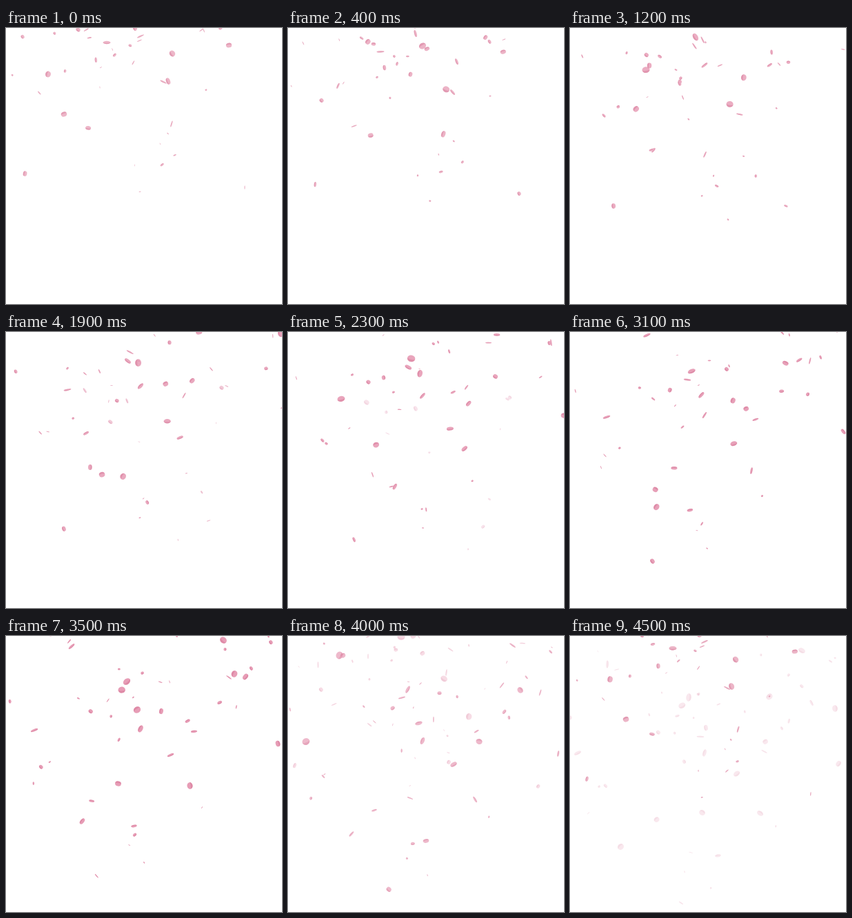
Animation, 400 px wide and 400 px high, one loop 4600 ms. Source, as an HTML page with a canvas:

```html
<!DOCTYPE html>
<html>
<head>
<meta charset="utf-8">
<title>Falling petals</title>
<style>
html, body { margin: 0; width: 100%; height: 100%; overflow: hidden; background: #fff; }
canvas { display: block; width: 400px; height: 400px; }
</style>
</head>
<body>
<canvas id="stage" width="400" height="400"></canvas>
<script>
const LOOP = 4600, STEP = 100, LATE = 3500;
const ctx = document.getElementById('stage').getContext('2d');

let seed = 11;
const random = (min = 0, max = 1) => {
  seed = seed * 16807 % 2147483647;
  return min + (max - min) * seed / 2147483647;
};
const clamp = v => Math.max(0, Math.min(1, v));
const repeat = (n, make) => Array.from({ length: n }, make);

// A petal passes x, y at time `at` and drifts at vx, vy px/s.
const petal = (at, size, [x, y, vx, vy], fadeFrom = 3700, fadeTo = 4750) => ({
  at, size, x, y, vx, vy, fadeFrom, fadeTo,
  tilt: random(0, Math.PI), turn: random(-1, 1),
  phase: random(0, Math.PI), spin: random(2, 4)
});

// The large petals: already in the air, then arriving from above
const aloft = [
  [146, 21, -30, 33], [195, 12, 0, 35], [187, -1, -5.5, 22.6], [228, 78, 3, 27],
  [235, 77, 9, 40], [240, 139, -37, 37], [241, 37, 9, 29], [61, 67, 29, 42],
  [84, 125, 29, 43], [323, 25, -28, 24]
];
const arriving = [
  [175, 66, -3, 23], [95, 15, -41, 26], [190, 107, -1, 39], [315, 6, 21, 15],
  [331, 55, -42, 33], [347, 59, 37, 46], [323, 60, 27, 37], [394, 156, -5, 29]
];

// Small petals spread out from the upper left, thinning towards the ground
const drift = (width, depth) =>
  [width * random(), depth * random() ** 2, random(-28, 30), random(22, 44)];
const smallSize = () => 3 + 5 * random() ** 1.5;

const petals = [
  ...aloft.map((path, i) => petal(0, 11 - 0.3 * i, path)),
  ...repeat(15, () => petal(0, smallSize(), drift(280, 220))),
  ...repeat(11, () => petal(0, smallSize(), drift(370, 380), 1400, 2700)),
  ...arriving.map((path, i) => petal(LATE, 11.5 - 0.4 * i, path)),
  ...repeat(16, () => petal(LATE, smallSize(), drift(390, 110)))
];

function drawPetal(p, t) {
  const fadeIn = p.at ? 1 : clamp((t + 1000) / 900);
  const fadeOut = clamp((p.fadeTo - t) / (p.fadeTo - p.fadeFrom));
  const s = t / 1000, age = (t - p.at) / 1000;
  const facing = Math.cos(p.phase + p.spin * s) ** 2;
  const long = p.size / 2, wide = long * (0.18 + 0.7 * facing);
  const light = 82 - 6 * clamp(Math.abs(t) / LATE);

  ctx.save();
  ctx.globalAlpha = fadeIn * fadeOut;
  ctx.translate(p.x + p.vx * age, p.y + p.vy * age);
  ctx.rotate(p.tilt + p.turn * s);
  ctx.fillStyle = `hsl(340 60% ${light}%)`;
  ctx.beginPath();
  ctx.ellipse(0, 0, long, wide, 0, 0, 2 * Math.PI);
  ctx.fill();
  // Shaded lower edge
  ctx.fillStyle = 'rgba(200, 85, 125, .28)';
  ctx.beginPath();
  ctx.ellipse(0, 0, long, wide, 0, 0, Math.PI);
  ctx.ellipse(0, 0, long, wide * 0.3, 0, Math.PI, 0, true);
  ctx.fill();
  ctx.restore();
}

function frame(now) {
  const t = Math.floor(now % LOOP / STEP) * STEP;
  ctx.fillStyle = '#fff';
  ctx.fillRect(0, 0, 400, 400);
  for (const p of petals) {
    drawPetal(p, t);
    // The next shower fades in before this one ends
    if (!p.at) drawPetal(p, t - LOOP);
  }
  requestAnimationFrame(frame);
}
requestAnimationFrame(frame);
</script>
</body>
</html>
```
